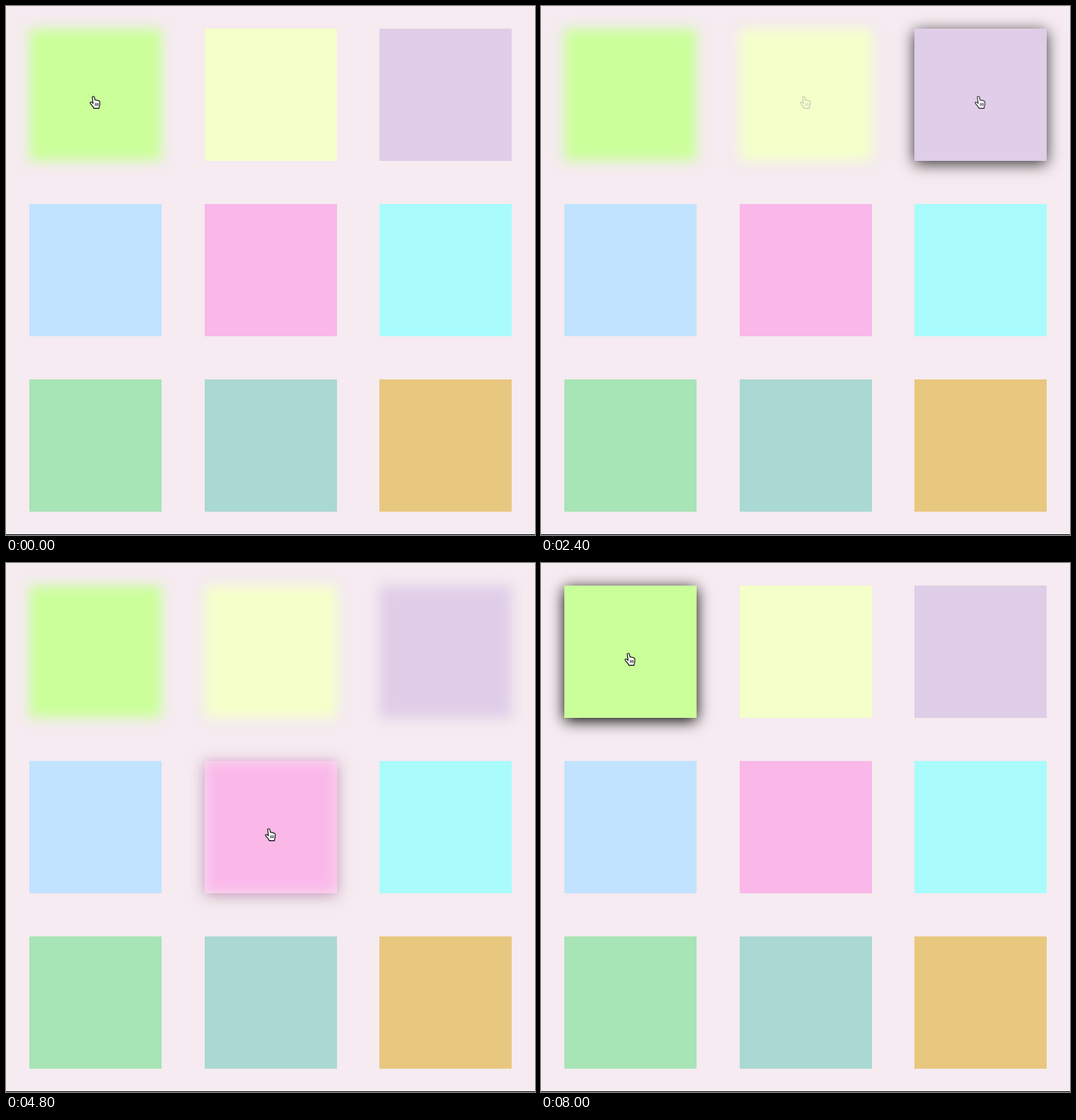
These frames come from a looping animation (748 px wide and 748 px high, 8300 ms). An HTML page:

```html
<!DOCTYPE html>
<html lang="en">
<head>
<meta charset="utf-8">
<title>Tile pattern</title>
<style>
  html, body { margin: 0; width: 100%; height: 100%; overflow: hidden; background: #f5ebf0; }
  #stage { position: relative; width: 748px; height: 748px; overflow: hidden; background: #f5ebf0; }
  #stage::after { content: ""; position: absolute; left: 0; bottom: 0; width: 100%; height: 1px; background: #000; }
  .tile { position: absolute; width: 187px; height: 187px; }
  .faces { position: absolute; inset: 0; isolation: isolate; }
  .face { position: absolute; inset: 0; background: var(--color); mix-blend-mode: plus-lighter; }
  .lift { box-shadow: 0 4px 20px #000; }
  .glow { filter: blur(8.5px); }
  .hand { position: absolute; left: 85px; top: 95px; width: 16px; height: 19px; }
</style>
</head>
<body>
<div id="stage"></div>
<script>
  const LOOP = 8300, FADE = 350, TICK = 100;
  const COLORS = ["#cbff9a", "#f4ffca", "#e0cde8", "#c1e3ff", "#fab7e9", "#a9fbfc", "#a7e4b6", "#aad8d3", "#e8c77f"];
  const LEFT = [33, 280.5, 528.3], TOP = [32, 279.5, 527.5];
  const FACES = { ".": "plain", L: "lift", G: "glow" };

  // Start time, face of each tile, tile under the pointer
  const SCENES = [
    [0,    "G........", 0],
    [500,  "GL.......", 1],
    [1380, "GG.......", 1],
    [2180, "GGL......", 2],
    [2880, "GGG......", 2],
    [3740, "GGG.L....", 4],
    [4580, "GGG.G....", 4],
    [5480, "GGG.G.L..", 6],
    [6300, "GGG.G....", 6],
    [6930, "L........", 0]
  ];

  const HAND = `<svg class="hand" viewBox="0 0 16 19">
    <path d="M4 2.3C3.8.3 6.5.2 7 2L8 6.2C8.8 5.4 10 5.7 10.3 6.6C11.2 6 12.2 6.3 12.5 7.2C13.6 6.8 14.7 7.5 14.7 8.7V12C14.7 13.7 13.7 14.8 13.7 16V17.6H6V16.4C4.5 14.6 2.6 12.4 1.2 10.6C.4 9.3 2 8.1 3.2 9.1L5.2 10.7Z"
      fill="#fff" stroke="#000" stroke-width="1.1" stroke-linejoin="round"/>
    <path d="M8.3 10.2V14M10.3 10.2V14M12.3 10.2V14" stroke="#000" stroke-width=".9"/></svg>`;

  const stage = document.getElementById("stage");
  const tiles = COLORS.map((color, i) => {
    const tile = document.createElement("div");
    tile.className = "tile";
    tile.style.left = LEFT[i % 3] + "px";
    tile.style.top = TOP[Math.floor(i / 3)] + "px";
    tile.style.setProperty("--color", color);
    const faces = Object.values(FACES).map(name => `<div class="face ${name}"></div>`).join("");
    tile.innerHTML = `<div class="faces">${faces}</div>${HAND}`;
    stage.append(tile);
    return { faces: [...tile.querySelectorAll(".face")], hand: tile.querySelector(".hand") };
  });

  const easeOut = x => 1 - (1 - x) ** 1.6;

  function draw(time) {
    const t = Math.floor((time % LOOP) / TICK) * TICK;
    const at = SCENES.findLastIndex(scene => scene[0] <= t);
    const [start, now, pointer] = SCENES[at];
    const [, before, lastPointer] = SCENES[Math.max(at - 1, 0)];
    const p = easeOut(Math.min((t - start) / FADE, 1));
    const mix = (was, is) => was * (1 - p) + is * p;

    tiles.forEach((tile, i) => {
      Object.keys(FACES).forEach((key, k) => {
        tile.faces[k].style.opacity = mix(before[i] === key, now[i] === key);
      });
      tile.hand.style.opacity = mix(lastPointer === i, pointer === i);
    });
  }

  const begin = performance.now();
  function loop() {
    draw(performance.now() - begin);
    requestAnimationFrame(loop);
  }
  loop();
</script>
</body>
</html>
```
